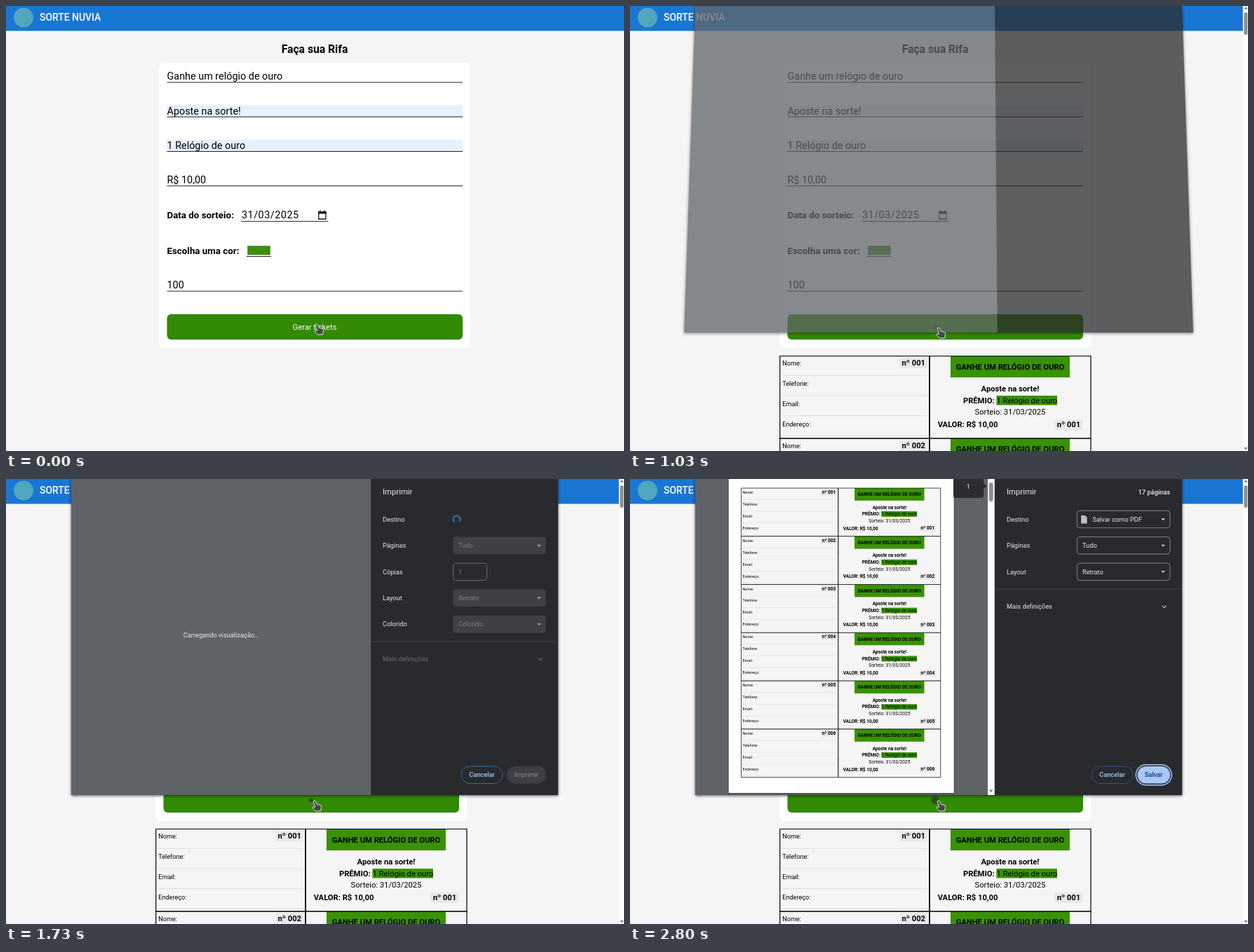
Write an HTML page that moves like this. It is 881 px wide and 635 px high and loops after 2870 ms.

```html
<!DOCTYPE html>
<html lang="pt-BR">
<head>
<meta charset="utf-8">
<title>Rifa</title>
<style>
html, body { margin: 0; width: 100%; height: 100%; overflow: hidden; background: #f5f5f5; }
svg, #dialog { position: absolute; left: 0; top: 0; }
svg { display: block; }
text { font-family: Roboto, "Open Sans", sans-serif; white-space: pre; }
.mid { text-anchor: middle; }
.end { text-anchor: end; }
.b { font-weight: 700; }
.m { font-weight: 500; }
.field { font-size: 14.4px; }
.label { font-size: 13.33px; font-weight: 700; }
.small { font-size: 11.2px; }
.tag { font-size: 9.15px; }

#dialog { left: 93px; width: 694px; height: 451px; background: #5f6368; transform-origin: 50% 0; box-shadow: 0 1px 4px rgba(0,0,0,.65); }
#dialog svg { left: -93px; }
#dialog text { font-size: 9.25px; fill: #e8eaed; }
#dialog .head { font-size: 11.3px; }
#dialog .dim text { fill: #7d7f83; }
#dialog .off { fill: #6b6d70; }
#dialog .link { fill: #a8c7fa; }
#dialog .dark { fill: #0b3570; }
#preview .small { font-size: 11.2px; fill: #000; }
#dialog #preview .small { font-size: 11.2px; fill: #000; }
#dialog #preview .tag { font-size: 9.15px; fill: #000; }

/* one loop = 2870ms */
#form, .before, .after, .load, .ready, #preview { animation: 2870ms step-end infinite; }
#form { animation-name: shift; }
.before { animation-name: before; }
.after { animation-name: after; }
.load { animation-name: load; }
.ready { animation-name: ready; }
#preview { animation-name: preview; }
#wait { animation: wait 2870ms linear infinite; }
#hover { animation: hover 2870ms linear infinite; }
#cursor { animation: point 2870ms linear infinite; }
#dot { animation: pulse 2870ms ease-in-out infinite; transform-box: fill-box; transform-origin: center; }
#dialog { animation: sheet 2870ms linear infinite; }
#spin { animation: spin 717.5ms -682.5ms linear infinite; transform-origin: 642.5px 57.5px; }

@keyframes shift { 0% { transform: none } 32.404%, to { transform: translateX(-5px) } }
@keyframes before { 0% { opacity: 1 } 32.404%, to { opacity: 0 } }
@keyframes after { 0% { opacity: 0 } 32.404%, to { opacity: 1 } }
@keyframes load { 0% { opacity: 0 } 41.8% { opacity: 1 } 66.2%, to { opacity: 0 } }
@keyframes ready { 0% { opacity: 0 } 66.2%, to { opacity: 1 } }
@keyframes preview { 0% { opacity: 0 } 76.3%, to { opacity: 1 } }
@keyframes wait { 0%, 41.8% { opacity: 0 } 41.81%, 68% { opacity: 1 } 72.5%, to { opacity: 0 } }
@keyframes hover {
  0% { opacity: 0 }
  3.484% { opacity: 0; animation-timing-function: steps(3, jump-start) }
  7.143%, to { opacity: 1 }
}
@keyframes point {
  0% { transform: translate(443px, 455px) }
  3.484% { transform: translate(443px, 455px); animation-timing-function: steps(3, jump-start) }
  7.143%, to { transform: translate(440px, 460px) }
}
@keyframes pulse {
  0%, 32.4% { transform: scale(1) }
  39.4%, 87.1% { transform: scale(.6) }
  97.56%, to { transform: scale(1.1) }
}
@keyframes sheet {
  0%, 32.4% { opacity: 0; transform: perspective(1587px) rotateX(36deg) }
  32.404% { opacity: 0; transform: perspective(1587px) rotateX(36deg); animation-timing-function: cubic-bezier(.5, 1, .89, 1) }
  39.373% { opacity: 1; transform: perspective(1587px) rotateX(0deg) }
  39.38%, to { opacity: 1; transform: none }
}
@keyframes spin { to { transform: rotate(360deg) } }
</style>
</head>
<body>
<svg width="881" height="635">
  <rect width="881" height="635" fill="#f5f5f5"/>
  <rect width="881" height="35.5" fill="#1976d2"/>
  <circle cx="25" cy="16.5" r="14" fill="#4fa6bd"/>
  <text class="m" x="48" y="21" font-size="13.9" fill="#fff">SORTE NUVIA</text>

  <g id="form">
    <text class="mid b" x="440" y="66.5" font-size="15.7">Faça sua Rifa</text>
    <rect x="218" y="81" width="444" height="407" rx="7" fill="#fff"/>
    <path d="M229.5 141.5h421.5v17h-421.5zM229.5 190.7h421.5v17h-421.5z" fill="#e8f0fe"/>
    <path d="M229.5 109h421.5M229.5 158.2h421.5M229.5 207.5h421.5M229.5 256.7h421.5M229.5 407h421.5M335.5 307.3h124M343 357.5h35" stroke="#222"/>
    <g class="field">
      <text x="229.5" y="105.3">Ganhe um relógio de ouro</text>
      <text x="229.5" y="154.5">Aposte na sorte!</text>
      <text x="229.5" y="203.7">1 Relógio de ouro</text>
      <text x="229.5" y="252.9">R$ 10,00</text>
      <text x="336" y="303.2" letter-spacing=".5">31/03/2025</text>
      <text x="229.5" y="403.3">100</text>
    </g>
    <text class="label" x="229.5" y="303">Data do sorteio:</text>
    <text class="label" x="229.5" y="353.8">Escolha uma cor:</text>
    <path d="M445.7 294h10.2v10h-10.2z" fill="none" stroke="#111" stroke-width="1.3"/>
    <path d="M445 293.4h11.5v3h-11.5zM447 291.8h1.5v2h-1.5zM453 291.8h1.5v2h-1.5z" fill="#111"/>
    <rect x="344.5" y="342.5" width="32" height="12.5" fill="#3a9203" stroke="#858585"/>

    <rect x="229.5" y="439.7" width="421.5" height="36.3" rx="6" fill="#318a02"/>
    <g class="before">
      <text class="mid small" x="440" y="462" fill="#fff">Gerar tickets</text>
      <g id="hover">
        <rect x="229.5" y="440" width="421" height="35.7" rx="6" fill="#fff" stroke="#3f9215"/>
        <text class="mid small" x="440" y="462" fill="#2f8306">Gerar tickets</text>
      </g>
    </g>
    <circle class="after" cx="440" cy="458" r="0"/>
    <g class="after"><circle id="dot" cx="440" cy="458.3" r="5" fill="#2b4f1c"/></g>
  </g>

  <g class="after">
    <g id="tickets"></g>
    <rect x="873.7" width="7.3" height="635" fill="#fcfcfc"/>
    <rect x="875.3" y="9" width="5" height="32" rx="2.5" fill="#8f8f8f"/>
    <path d="M875.3 4.5h5.2l-2.6-3.3zM875.3 630h5.2l-2.6 3.3z" fill="#777"/>
  </g>
</svg>

<div id="dialog">
  <svg width="881" height="451">
    <rect x="520" width="267" height="451" fill="#292a2d"/>
    <g id="wait"><text class="mid" x="306.5" y="225.5">Carregando visualização…</text></g>

    <g class="load">
      <text class="head" x="537" y="22">Imprimir</text>
      <circle id="spin" cx="642.5" cy="57.5" r="5" fill="none" stroke="#3f8fd8" stroke-width="1.5" stroke-dasharray="23 8.4"/>
      <g id="loadRows"></g>
      <rect x="637.5" y="120.2" width="48" height="24.5" rx="4" fill="none" stroke="#6a6d71"/>
      <g class="dim"><text x="645" y="135.5">1</text></g>
      <path d="M520 232h267" stroke="#404144"/>
      <text class="off" x="537" y="260">Mais definições</text>
      <path d="M759 255.7l3 3 3-3" fill="none" stroke="#6b6d70" stroke-width="1.1"/>
      <rect x="649" y="410" width="59" height="24.5" rx="12.2" fill="none" stroke="#2a6da8"/>
      <text class="mid m link" x="678.5" y="425.3">Cancelar</text>
      <rect x="714" y="409.7" width="56" height="25" rx="12.5" fill="#3e3f42"/>
      <g class="dim"><text class="mid m" x="742" y="425.3">Imprimir</text></g>
    </g>

    <g class="ready">
      <text class="head" x="537" y="22">Imprimir</text>
      <text class="end m" x="770" y="22">17 páginas</text>
      <g id="readyRows"></g>
      <path d="M643 52h5.6l3 3v8.5h-8.6z" fill="#bdbdb8"/>
      <path d="M520 157h267" stroke="#404144"/>
      <text x="537" y="185.3">Mais definições</text>
      <path d="M758.7 180.7l3 3 3-3" fill="none" stroke="#c4c7cb" stroke-width="1.1"/>
      <rect x="658" y="410" width="59" height="24.5" rx="12.2" fill="none" stroke="#23598c"/>
      <text class="mid m link" x="687.5" y="425.3">Cancelar</text>
      <rect x="721.2" y="407.7" width="51" height="29" rx="14.5" fill="none" stroke="#a8c7fa" stroke-width="1.5"/>
      <rect x="723.5" y="410" width="46.5" height="24.5" rx="12.2" fill="#a8c7fa"/>
      <text class="mid m dark" x="746.5" y="425.3">Salvar</text>
    </g>

    <g id="preview">
      <rect x="139.5" width="323.5" height="449.5" fill="#4b4e52"/>
      <rect x="140.7" width="321" height="448" fill="#fff"/>
      <g id="sheetTickets" transform="translate(158.5 13) scale(.585)"></g>
      <path d="M461 0h43v6l4.5 4-4.5 4v10q0 3-3 3h-37q-3 0-3-3z" fill="#2c2d30"/>
      <text class="mid" x="482.3" y="13.5">1</text>
      <rect x="510" width="9.7" height="451" fill="#fcfcfc"/>
      <rect x="511.7" y="5" width="6" height="27" rx="3" fill="#8f8f8f"/>
      <path d="M512 443.5h5.6l-2.8 3.4z" fill="#777"/>
    </g>
  </svg>
</div>

<svg width="881" height="635">
  <path id="cursor" d="M-1.8 .2Q-1.4-1.4 .2-1Q1.4-.6 2 1L3.4 4.3 7.6 5.2Q10 5.8 9.6 8.4L8.6 13.6 1.6 14-2.6 9.8Q-3.4 8.4-2 7.8L.6 8.2Z" fill="#45464a" stroke="#f2f2f2" stroke-width=".9" stroke-linejoin="round"/>
</svg>

<script>
const byId = id => document.getElementById(id);
const text = (x, y, cls, str) => `<text x="${x}" y="${y}" class="${cls}">${str}</text>`;
const rect = (x, y, w, h, fill) => `<rect x="${x}" y="${y}" width="${w}" height="${h}" fill="${fill}"/>`;
const PITCH = 117.6, GREEN = '#3a9203';

// A raffle ticket: stub of width `stub`, whole width `full`
function ticket(n, stub, full) {
  const mid = (stub + full) / 2, num = 'nº ' + String(n).padStart(3, '0');
  const badge = (x, y) => rect(x - 19.7, y, 39.4, 14.8, '#e8e8e8') + text(x, y + 11, 'mid b small', num);
  const rows = ['Nome:', 'Telefone:', 'Email:', 'Endereço:'].map((s, i) =>
    text(3.5, 13.6 + i * 29, 'tag', s) +
    `<path d="M3.5 ${27.7 + i * 28.7}H${stub - 3}" stroke="#ddd"/>`).join('');
  return `<g transform="translate(0 ${(n - 1) * PITCH})">` +
    rect(0, 0, full, PITCH, '#f5f5f5') + rows + badge(stub - 22.7, 2.7) +
    rect(mid - 85, 0, 170, 30.5, GREEN) +
    text(mid, 19.2, 'mid b small', 'GANHE UM RELÓGIO DE OURO') +
    text(mid, 50.5, 'mid b small', 'Aposte na sorte!') +
    rect(mid - 19.5, 56.5, 86.5, 13.5, GREEN) +
    text(mid - 67, 67, 'b small', 'PRÊMIO:') +
    text(mid - 19.5, 67, 'small', '1 Relógio de ouro') +
    text(mid, 83.7, 'mid small', 'Sorteio: 31/03/2025') +
    text(stub + 11.7, 101.8, 'b small', 'VALOR: R$ 10,00') +
    badge(full - 31.5, 90.7) +
    `<path d="M0 0H${full}V${PITCH}H0Z" fill="none" stroke="#000" stroke-width="1.2"/>` +
    `<path d="M${stub} 0V${PITCH}" stroke="#000" stroke-width="1.8"/></g>`;
}

function select(row, label, value, on, indent = 0) {
  const y = 57.5 + row * 37.4;
  const style = on ? 'fill="none" stroke="#80868b"' : 'fill="#404144"';
  return text(537, y + 3.2, '', label) + (value ?
    `<rect x="637.3" y="${y - 12.3}" width="132.4" height="24.6" rx="4" ${style}/>` +
    `<g class="${on ? '' : 'dim'}">${text(645 + indent, y + 3.2, '', value)}</g>` +
    `<path d="M757 ${y - 1.2}h6l-3 3z" fill="${on ? '#c4c7cb' : '#a0a2a5'}"/>` : '');
}

byId('tickets').setAttribute('transform', 'translate(213.7 499.5)');
byId('tickets').innerHTML = [1, 2].map(n => ticket(n, 213.3, 443.2)).join('');
byId('sheetTickets').innerHTML = [1, 2, 3, 4, 5, 6].map(n => ticket(n, 236.5, 486)).join('');
byId('loadRows').innerHTML = select(0, 'Destino') + select(1, 'Páginas', 'Tudo') + select(2, 'Cópias') +
  select(3, 'Layout', 'Retrato') + select(4, 'Colorido', 'Colorido');
byId('readyRows').innerHTML = select(0, 'Destino', 'Salvar como PDF', true, 14.3) +
  select(1, 'Páginas', 'Tudo', true) + select(2, 'Layout', 'Retrato', true);
</script>
</body>
</html>
```
